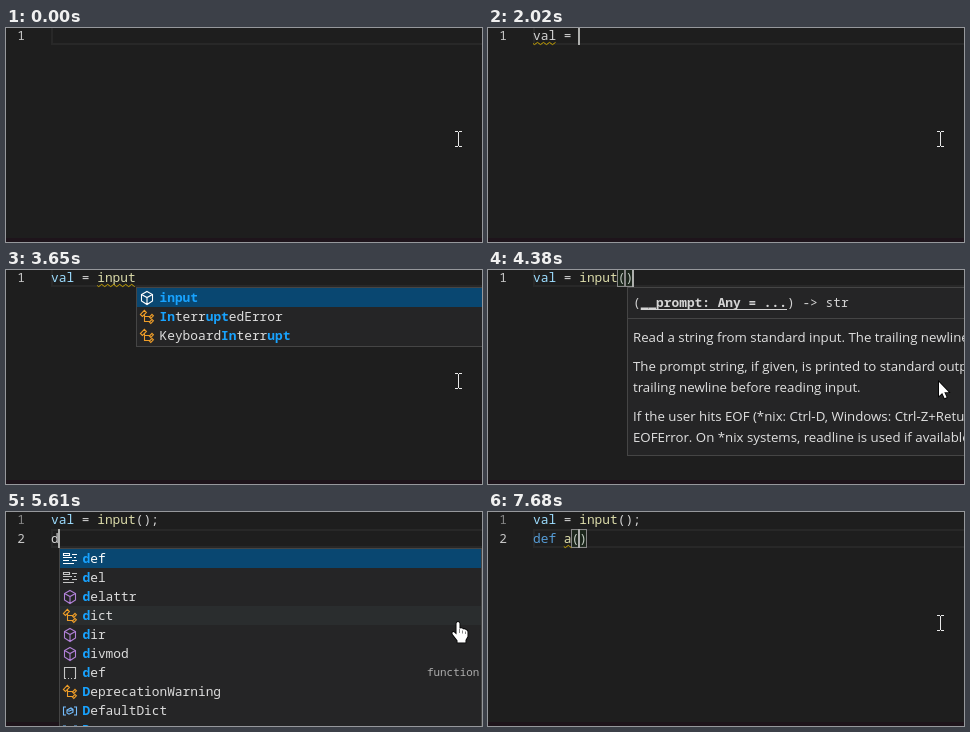
Recreate the animation shown at these times as an HTML page with a canvas. Size 476 px wide and 214 px high, loop 8000 ms.

```html
<!DOCTYPE html>
<html lang="en">
<head>
<meta charset="utf-8">
<title>Editor autocomplete</title>
<style>
  html, body { margin: 0; overflow: hidden; background: #1e1e1e; }
  canvas { display: block; }
</style>
</head>
<body>
<canvas id="stage" width="476" height="214"></canvas>
<script>
const ctx = document.getElementById('stage').getContext('2d');
const LOOP = 8000, CHAR = 7.7, LINE = 19, LEFT = 45;
const MONO = '12.83px "Noto Sans Mono", monospace';
const SANS = '13.25px "Open Sans", sans-serif';
const SMALL = '10.9px "Noto Sans Mono", monospace';
const TEXT = '#d4d4d4', BORDER = '#454545', PANEL = '#252526';

// Completion entries: icon letter, label with [matched] parts, optional |detail
const entries = text => text.split(' ');
const V = entries('m[v]ars c[V]alueError mInt[V]ar');
const VA = entries('m[va]rs c[Va]lueError mInt[Va]r');
const VAL = entries('c[Val]ueError');
const I = entries('k[i]f k[i]mport k[i]n k[i]s m[i]d m[i]nput c[i]nt m[i]sinstance m[i]ssubclass m[i]ter c[I]mportError');
const IN = entries('k[in] m[in]put c[in]t c[In]dentationError c[In]dexError c[In]terruptedError m[In]tVar m[i]si[n]stance c[I]de[n]tityFunction cKeyboard[In]terrupt c[I]mportWar[n]ing');
const INP = entries('m[inp]ut c[In]terru[p]tedError cKeyboard[In]terru[p]t');
const INPU = entries('m[inpu]t c[In]terr[up]tedError cKeyboard[In]terr[up]t');
const INPUT = entries('m[input] c[In]terr[upt]edError cKeyboard[In]terr[upt]');
const D = entries('k[d]ef k[d]el m[d]elattr c[d]ict m[d]ir m[d]ivmod s[d]ef|function c[D]eprecationWarning v[D]efaultDict v[D]ummy');
const DE = entries('k[de]f k[de]l m[de]lattr s[de]f|function c[De]precationWarning v[De]faultDict cIn[de]ntationError cIn[de]xError cUnico[de]Error mco[de]');
const DEF = entries('k[def] s[def]|function v[Def]aultDict');

const type = (time, text, list, extra) =>
  [time, { lines: text.split('\n'), list, caret: true, back: 0, ...extra }];

const FIRST = 'val = input();\n';
const VAL_WARN = { warn: [0, 0, 3] }, NO_WARN = { warn: null };
const EVENTS = [
  type(0, '', null, { caret: false, mouse: 'beam', tip: false, warn: null }),
  [190, { caret: true }],
  type(390, 'v', V),
  type(650, 'va', VA),
  type(780, 'val', VAL),
  type(910, 'val '),
  [1170, VAL_WARN],
  [1380, { caret: false }],
  type(1890, 'val ='),
  type(2020, 'val = '),
  type(2210, 'val = i', I),
  [2280, { mouse: 'hand' }],
  type(2470, 'val = in', IN),
  type(2730, 'val = inp', INP, { mouse: 'beam' }),
  type(3010, 'val = inpu', INPU, NO_WARN),
  type(3200, 'val = input', INPUT),
  [3650, { caret: false, warn: [0, 6, 5] }],
  type(3780, 'val = input()', null, { back: 1, ...NO_WARN }),
  [3920, { tip: true }],
  [3990, { mouse: 'arrow' }],
  [4310, { caret: false }],
  type(4380, 'val = input()'),
  [4440, { tip: false }],
  [4500, { mouse: 'beam' }],
  type(4890, 'val = input();'),
  type(5090, FIRST),
  type(5540, FIRST + 'd', D),
  [5610, { mouse: 'hand' }],
  type(5740, FIRST + 'de', DE),
  type(5890, FIRST + 'def', DEF, { mouse: 'beam' }),
  type(6010, FIRST + 'def '),
  type(6200, FIRST + 'def a'),
  [6460, { warn: [1, 4, 1] }],
  [6650, { caret: false }],
  [7160, { caret: true }],
  type(7610, FIRST + 'def a()', null, { back: 1 }),
];

const ICONS = {
  k: ['#c5c5c5', 'M1.5 2.5h6v2h-6zM10 3.5h5M1 6.5h9M12 6.5h2M1 9.5h6M10 9.5h5M1 12.5h11'],
  m: ['#b180d7', 'M8 1.5l5.5 3v6.5l-5.5 3.5-5.5-3.5v-6.5zM2.5 4.5l5.5 3 5.5-3M8 7.5v7'],
  c: ['#ee9d28', 'M5.4 1.4l2 2-4 4-2-2zM5.5 5.500v7h5M5.500 7.500h5M13 5.400l1.400 1.400-2.600 2.600-1.400-1.400zM13 10.400l1.400 1.400-2.600 2.600-1.400-1.400z'],
  s: ['#c5c5c5', 'M2.5 13V2.5h11V13M2 13.5h2M6 13.5h1M9 13.5h1M12 13.5h2'],
  v: ['#75beff', 'M4 4H1.5v8H4M12 4h2.5v8H12M5 7l4-2 2 1.2v3l-4 2-2-1.2zM5 7l2 1.2 4-2'],
};
const HAND = new Path2D('M450.500 122.500v-11q0-1.500 1.500-1.500t1.500 1.500v5q3-.8 3.500.8 2.500-.6 3 1 1.500-.2 1.500 1.700v4.500l-2 3.500v2.500h-8v-2l-5-6.500q-.7-2 1.200-2z');
const ARROW = new Path2D('M451 112v14l3.200-3 2.400 5.300 2-1-2.300-5h4.500z');

const xAt = col => LEFT + col * CHAR;

function rect(x, y, w, h, color) {
  ctx.fillStyle = color;
  ctx.fillRect(x, y, w, h);
}

function write(text, x, y, color = TEXT, font = MONO) {
  ctx.font = font;
  ctx.fillStyle = color;
  ctx.fillText(text, x, y);
}

function stroke(path, color, width = 1) {
  ctx.strokeStyle = color;
  ctx.lineWidth = width;
  ctx.stroke(path);
}

function panel(x, y, w, h) {
  rect(x, y, w, h, BORDER);
  rect(x + 1, y + 1, w - 2, h - 2, PANEL);
}

function tokenColor(word, line) {
  if (word === 'val' && line.includes('i')) return '#9cdcfe';
  if (word === 'input' || (word === 'a' && line.includes('('))) return '#dcdcaa';
  if (word === 'def' || word === 'in') return '#569cd6';
  return TEXT;
}

function drawLine(line, row) {
  let col = 0;
  for (const word of line.match(/\w+|\W+/g) || []) {
    write(word, xAt(col), row * LINE + 12, tokenColor(word, line));
    col += word.length;
  }
}

function drawBrackets(line, row) {
  const start = line.indexOf('()');
  if (start < 0 || line.endsWith(';')) return;
  for (const col of [start, start + 1]) {
    const x = Math.floor(xAt(col)), y = row * LINE - 2;
    rect(x, y, 8, LINE, 'rgba(0,100,0,.1)');
    ctx.strokeStyle = '#888';
    ctx.lineWidth = 1;
    ctx.strokeRect(x + .5, y + .5, 7, LINE - 1);
  }
}

function drawWarning([row, col, length]) {
  const path = new Path2D(), y = row * LINE + 15.5, start = xAt(col);
  for (let x = 0; x <= length * CHAR; x += 1.5) {
    path.lineTo(start + x, y + Math.sin(x * Math.PI / 3) * 1.1);
  }
  stroke(path, '#cca700');
}

function drawEntry(entry, x, y, selected) {
  const [label, detail] = entry.slice(1).split('|');
  const [color, shape] = ICONS[entry[0]];
  ctx.save();
  ctx.translate(x + 3, y + 2);
  stroke(new Path2D(shape), selected ? '#fff' : color, 1.1);
  ctx.restore();
  let textX = x + 23.5;
  label.split(/[[\]]/).forEach((part, i) => {
    if (i % 2) write(part, textX, y + 14, '#18a3ff', 'bold ' + MONO);
    else write(part, textX, y + 14, selected ? '#fff' : '#dcdcdc', '500 ' + MONO);
    textX += part.length * CHAR;
  });
  if (detail) write(detail, 421, y + 13, '#acacac', SMALL);
}

function drawList(list, col, row, hover) {
  const x = Math.round(xAt(col)), y = row * LINE + 17, width = 423;
  panel(x, y, width, list.length * LINE + 3);
  list.forEach((entry, i) => {
    const top = y + 1 + i * LINE;
    if (!i) rect(x + 1, top, width - 2, LINE, '#094771');
    else if (hover && top <= 111 && top + LINE > 111) rect(x + 1, top, width - 2, LINE, '#2a2d2e');
    drawEntry(entry, x, top, !i);
  });
}

function drawTip() {
  const bold = '__prompt: Any = ...', x = 145, y = 37;
  panel(139, 17, 400, 169);
  write('(', x, y);
  write(bold, x + CHAR, y, TEXT, 'bold ' + MONO);
  rect(x + CHAR, y + 2, bold.length * CHAR, 1, TEXT);
  write(') -> str', x + 20 * CHAR, y, TEXT, '500 ' + MONO);
  rect(140, 48, 400, 1, BORDER);
  const doc = [
    [72, 'Read a string from standard input. The trailing newline is stripped.'],
    [101, 'The prompt string, if given, is printed to standard output without a'],
    [122, 'trailing newline before reading input.'],
    [151, 'If the user hits EOF (*nix: Ctrl-D, Windows: Ctrl-Z+Return), raise'],
    [172, 'EOFError. On *nix systems, readline is used if available.'],
  ];
  for (const [baseline, text] of doc) write(text, x, baseline, '#e0e0e0', SANS);
}

function drawMouse(kind) {
  if (kind === 'beam') {
    rect(452, 104, 1, 14, '#e8e8e8');
    for (const y of [103, 118]) {
      rect(449, y, 3, 1, '#e8e8e8');
      rect(453, y, 3, 1, '#e8e8e8');
    }
    return;
  }
  const path = kind === 'hand' ? HAND : ARROW;
  stroke(path, '#000', 1.6);
  ctx.fillStyle = '#fff';
  ctx.fill(path);
  if (kind === 'hand') stroke(new Path2D('M453.500 117v4M456.500 118.500v3M459.500 119.500v2.500'), '#555', .7);
}

function draw(time) {
  const state = Object.assign({}, ...EVENTS.filter(([at]) => at <= time).map(([, change]) => change));
  const { lines, list, back, warn } = state;
  const row = lines.length - 1, col = lines[row].length - back;
  const top = row * LINE - 2;

  rect(0, 0, 476, 214, '#1e1e1e');
  rect(0, 210, 476, 4, '#1e141b');
  rect(LEFT, top, 440, LINE, '#282828');
  rect(LEFT + 2, top + 2, 440, LINE - 4, '#1e1e1e');
  lines.forEach((line, i) => {
    write(i + 1, 11.3, i * LINE + 12, i === row ? '#c6c6c6' : '#858585');
    drawLine(line, i);
  });
  drawBrackets(lines[row], row);
  if (warn) drawWarning(warn);
  if (state.caret) rect(Math.max(LEFT, Math.floor(xAt(col) - .6)), top, 2, LINE, '#aeafad');
  if (list) drawList(list, col, row, state.mouse === 'hand');
  if (state.tip) drawTip();
  drawMouse(state.mouse);
}

const start = performance.now();
function tick() {
  draw((performance.now() - start) % LOOP);
  requestAnimationFrame(tick);
}
tick();
</script>
</body>
</html>
```
